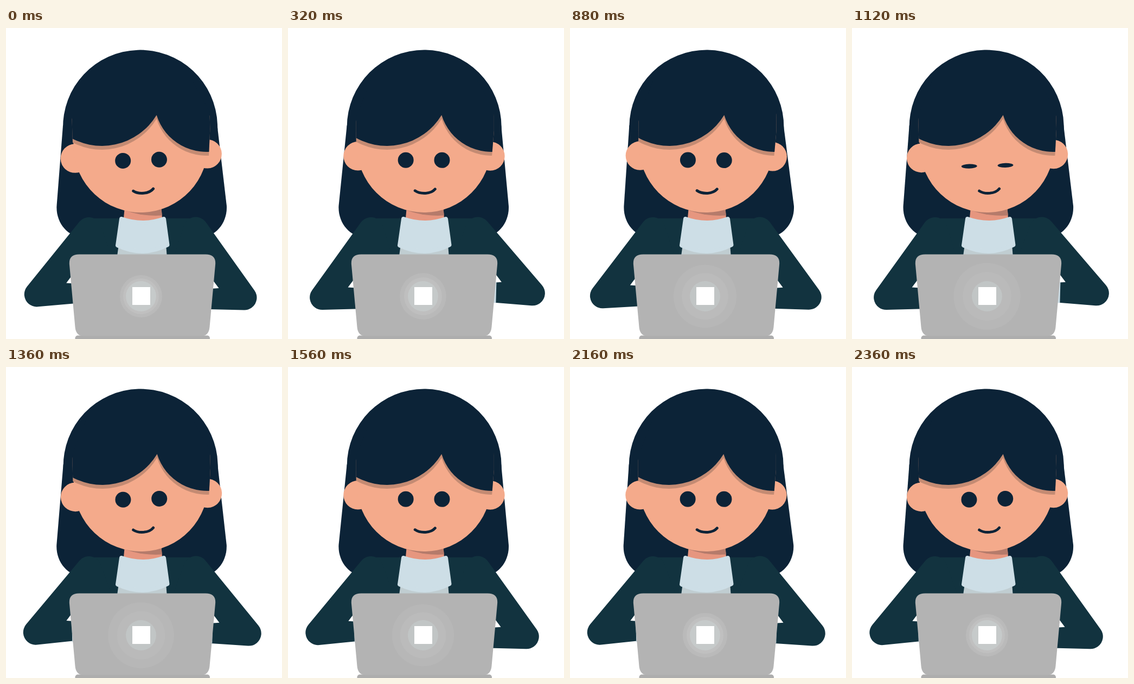
These frames come from a looping animation (509 by 575 pixels, 2.4 s). An HTML page:

```html
<!DOCTYPE html>
<html lang="en">
<head>
<meta charset="utf-8">
<title>Typing at a laptop</title>
<style>
  html, body { margin: 0; width: 100%; height: 100%; overflow: hidden; background: #fff; }
  svg { display: block; width: 509px; height: 575px; }
  .hair { fill: #0c2337; }
  .skin { fill: #f4aa8b; }
  .jacket { fill: #12333f; }
  .arm { fill: #12333f; stroke: #12333f; stroke-width: 46; stroke-linejoin: round; }
  .cuff { fill: #cddee6; }
  .gap, .glow { fill: #fff; }
</style>
</head>
<body>
<svg viewBox="0 0 509 575">
  <defs>
    <path id="fringeShape" d="M115 197A118 118 0 0 0 283 161A96.2 96.2 0 0 0 400 225.7V190L345 90H155L115 190Z"/>
    <clipPath id="fringeEdge"><path d="M125.5 60V245H375.3L379.7 190V60Z"/></clipPath>
  </defs>

  <path id="backHair" class="hair"/>
  <path class="jacket" d="M153 352H350L370 540H130Z"/>
  <path fill="#e6967f" d="M219 330H286L289 362H216Z"/>
  <path fill="#b57b6b" d="M219 330H286L288 346.5Q252 349 219 337Z"/>

  <path id="leftArm" class="arm"/>
  <path id="leftGap" class="gap"/>
  <path id="leftCuff" class="cuff"/>
  <path id="rightArm" class="arm"/>
  <path id="rightGap" class="gap"/>
  <path id="rightCuff" class="cuff"/>

  <path fill="#c0cdd1" d="M208 400H295L297 425H204.5Z"/>
  <path fill="#cddee6" stroke="#cddee6" stroke-width="8" stroke-linejoin="round"
        d="M213 353Q252 367 291 353L297.5 401Q252 424 206 402Z"/>

  <g id="head">
    <path class="hair" d="M108.5 193V183A142.5 142.5 0 0 1 393.5 183V193Z"/>
    <circle class="skin" cx="129" cy="237" r="26.8"/>
    <circle class="skin" cx="372.8" cy="236.8" r="26.8"/>
    <circle class="skin" cx="250.7" cy="217" r="124"/>
    <g clip-path="url(#fringeEdge)">
      <g id="fringe">
        <use href="#fringeShape" y="7" fill="#c48b73"/>
        <use href="#fringeShape" class="hair"/>
      </g>
    </g>
    <ellipse class="hair eye" cx="217.1" rx="14.5"/>
    <ellipse class="hair eye" cx="283.9" rx="14.5"/>
    <path fill="none" stroke="#0c2337" stroke-width="5" stroke-linecap="round"
          d="M234.3 300.8C244 307.5 263 307.5 271.3 297.8"/>
  </g>

  <rect x="127.5" y="568.5" width="248.5" height="14" rx="5" fill="#adadad"/>
  <path fill="#b3b3b3" d="M135 418.5H368Q388 418.5 386 438L375.5 553Q374 569.5 360 569.5H143Q129 569.5 127.5 553L117 438Q115 418.5 135 418.5Z"/>
  <circle id="outerGlow" class="glow" cx="249" cy="496"/>
  <circle id="midGlow" class="glow" cx="249" cy="496"/>
  <circle fill="#dff0f0" opacity=".18" cx="249" cy="496" r="28"/>
  <rect x="233" y="479" width="33" height="33" fill="#fff"/>
</svg>
<script>
const LOOP = 2400, STEP = 40;
const $ = id => document.getElementById(id);
const eyes = document.querySelectorAll('.eye');
const setPath = (id, d) => $(id).setAttribute('d', d);

// Smooth 0 -> 1 -> 0 wave that is 0 at time `start`
const wave = (t, period, start = 0) => (1 - Math.cos((t - start) / period * 2 * Math.PI)) / 2;

function drawArm(side, dir, shoulder, elbow, wrist, inner) {
  const [ex, ey] = elbow, gapY = inner[1];
  setPath(side + 'Arm', `M${shoulder}L${elbow}L${wrist}Z`);
  setPath(side + 'Gap', `M${inner}l${15 * dir} -20v21Z`);
  setPath(side + 'Cuff', `M${ex + 66.5 * dir} ${gapY}h${20 * dir}V${ey + 18}H${ex + 67.5 * dir}Z`);
}

function drawHair(sway, swing) {
  const shift = 6.9 * (sway - 0.5);
  const left = 93.3 + 7 * swing, right = left + 313.5;
  setPath('backHair', `M${108.5 + shift} 180L${left} 329C${left - 1.5} 360 ${left + 20} 387 ${left + 50} 387
    H${right - 50}C${right - 20} 387 ${right + 1.5} 360 ${right} 329L${393 + shift} 180Z`);
}

// The fringe slides sideways without tilting, while its clipped ends follow the head
function drawHead(sway) {
  const tilt = 3.8 * (sway - 0.5);
  $('head').setAttribute('transform', `rotate(${tilt} 251 287)`);
  $('fringe').setAttribute('transform', `rotate(${-tilt} 251 287) translate(${10.6 * (sway - 0.5)})`);
}

function drawEyes(open) {
  for (const eye of eyes) {
    eye.setAttribute('ry', 14.5 * open);
    eye.setAttribute('cy', 258.8 - 14.5 * open);
  }
}

function drawGlow(id, radius, opacity) {
  $(id).setAttribute('r', radius);
  $(id).setAttribute('opacity', opacity);
}

function render(t) {
  const sway = wave(t, 1240);
  drawHair(sway, wave(t, 1240, 160) ** 2);
  drawHead(sway);
  drawEyes(Math.min(1, Math.max(0.28, Math.abs(t - 1140) / 140)));

  const l = wave(t, 800, 650), r = wave(t, 800);
  drawArm('left', 1, [153, 373], [53.5 + 10.4 * l, 489.5 + 9.3 * l],
    [190, 473.5 + 23 * l], [111.5 - l, 467.5 + 13 * l]);
  drawArm('right', -1, [350, 372.5], [439.5 + 12.6 * r, 498.5 - 9 * r],
    [310, 495.5 - 18.5 * r], [392.5 + 1.5 * r, 481 - 12.5 * r]);

  const pulse = wave(t, LOOP);
  drawGlow('outerGlow', 39 + 23 * pulse, 0.09 - 0.045 * pulse);
  drawGlow('midGlow', 33 + 12 * pulse, 0.09 - 0.045 * pulse);
}

const start = performance.now();
function tick() {
  const t = (performance.now() - start) % LOOP;
  render(Math.floor(t / STEP) * STEP);
  requestAnimationFrame(tick);
}
tick();
</script>
</body>
</html>
```
